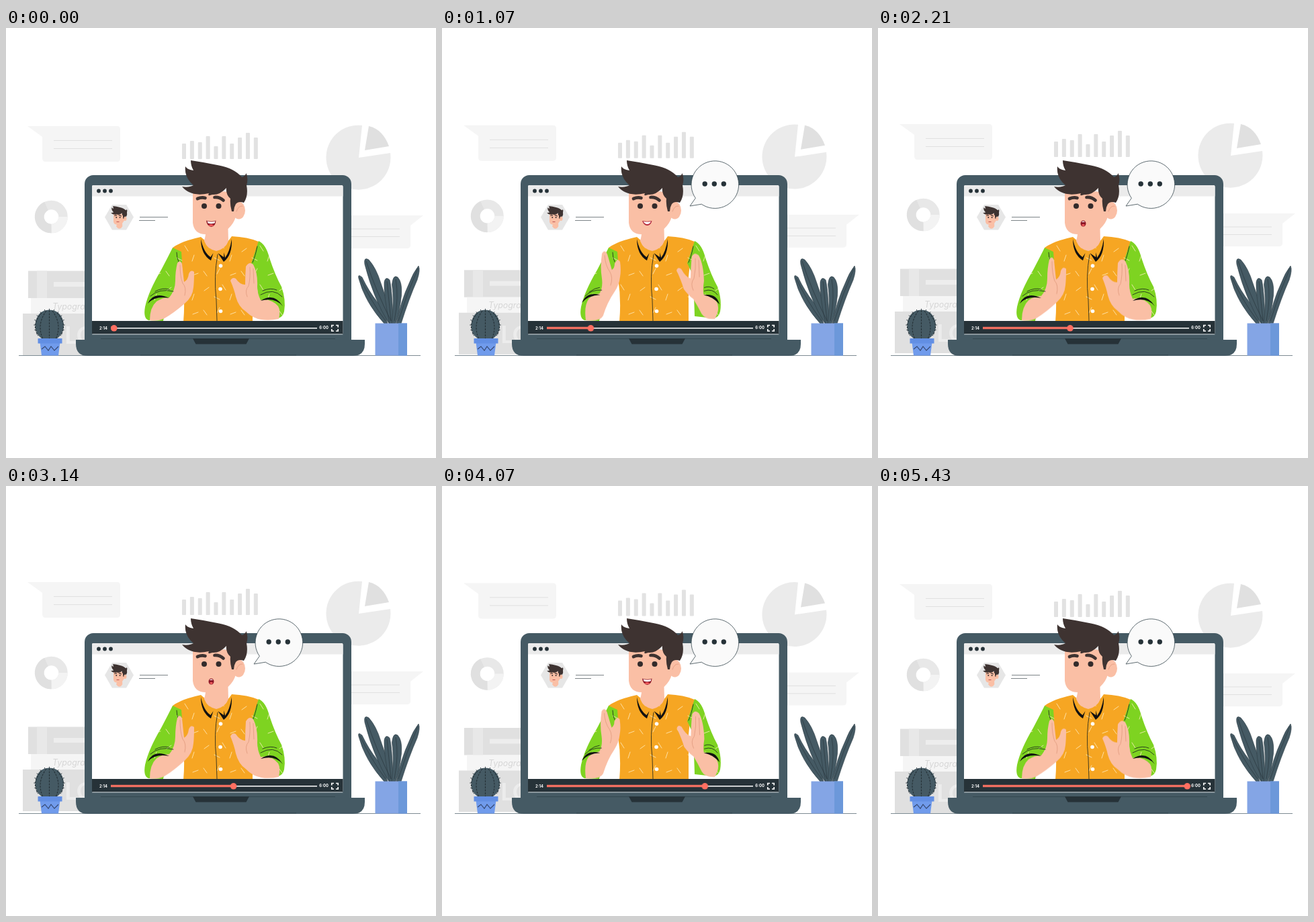
Animation of 640x640 px, one loop 5.5 s. Source, as an HTML page:

```html
<!DOCTYPE html>
<html lang="en">
<head>
<meta charset="utf-8">
<title>Video lesson</title>
<style>
html, body { margin: 0; width: 100%; height: 100%; overflow: hidden; background: #fff; }
svg { display: block; width: 100%; height: 100%; }
text { font-family: Inter, "Open Sans", sans-serif; }
.float { animation: float 5.5s infinite; }
.bubble { transform-origin: 369px 265px; animation: pop 5.5s infinite; }
.knob { animation: slide 5.5s linear infinite; }
.played { transform-origin: 156px 446px; animation: fill 5.5s linear infinite; }
.arm path { animation: 5.5s cubic-bezier(.37, 0, .63, 1) infinite; }
.lift { transform-origin: 0 435px; animation: lift 5.5s cubic-bezier(.37, 0, .63, 1) infinite; }
#lHand { animation-name: lHand; }
#lLine { animation-name: lLine; }
#lCuff { animation-name: lCuff; }
#lFold { animation-name: lFold; }
#rHand { animation-name: rHand; }
#rLine { animation-name: rLine; }
#rCuff { animation-name: rCuff; }
#rFold { animation-name: rFold; }
.skin { fill: #fabfa5; }
.crease { fill: none; stroke: #d98f72; stroke-width: .6; stroke-linecap: round; }
.thin { fill: none; stroke: #16201c; stroke-width: .8; stroke-linecap: round; }
.hair { fill: #3e3331; }
.leaf { fill: #455a64; stroke: #2c3c44; stroke-width: .6; }

@keyframes float {
  0%, 100% { transform: translateY(0); animation-timing-function: cubic-bezier(.37, 0, .63, 1); }
  48% { transform: translateY(-3.2px); animation-timing-function: cubic-bezier(.37, 0, .63, 1); }
}
@keyframes pop {
  0%, 5.4% { transform: scale(0); animation-timing-function: ease-in-out; }
  15.6%, 100% { transform: scale(1); }
}
@keyframes slide { 0% { transform: translateX(0); } 96.2%, 100% { transform: translateX(299.5px); } }
@keyframes fill { 0% { transform: scaleX(.015); } 96.2%, 100% { transform: scaleX(1); } }

/* each swing first stretches the low pose upwards, then turns it outwards */
@keyframes lift {
  0%, 21.8%, 49.5%, 76%, 81%, 100% { transform: scaleY(1); }
  7.3%, 40.2%, 58.9%, 92.7% { transform: scaleY(1.065); }
}
@keyframes lHand {
  0%, 7.3%, 40.2%, 58.9%, 92.7%, 100% { d: path("M214 435 Q214 416 224 407 Q233 401 243 401 Q252 391 252 376 Q252 362 255 350 Q259 344 262 351 L265 378 Q271 375 272 366 Q275 359 280 363 Q280 378 279 386 Q278 400 266 410 Q250 424 236 432 Q226 437 214 435Z"); }
  21.8%, 76%, 81% { d: path("M214 435 Q211 413 218 403 Q224 397 234 395 Q239 386 237 372 Q234 355 237 335 Q241 328 245 336 L252 359 Q256 357 256 350 Q260 341 264 347 Q266 360 264 370 Q263 381 256 392 Q246 407 240 428 Q236 437 214 435Z"); }
}
@keyframes lLine {
  0%, 7.3%, 40.2%, 58.9%, 92.7%, 100% { d: path("M259 353 Q259 370 263 380 Q269 386 266 398"); }
  21.8%, 76%, 81% { d: path("M241 338 Q242 353 249 362 Q254 371 250 382"); }
}
@keyframes lCuff {
  0%, 7.3%, 40.2%, 58.9%, 92.7%, 100% { d: path("M211 410 Q220 391 243 402 Q222 398 211 410Z"); }
  21.8%, 76%, 81% { d: path("M208 409 Q215 392 235 397 Q217 398 208 409Z"); }
}
@keyframes lFold {
  0%, 7.3%, 40.2%, 58.9%, 92.7%, 100% { d: path("M215 399 Q228 387 249 392 M222 392 Q233 386 243 389"); }
  21.8%, 76%, 81% { d: path("M213 399 Q222 389 237 390 M219 393 Q227 387 234 386"); }
}
@keyframes rHand {
  0%, 7.3%, 40.2%, 58.9%, 92.7%, 100% { d: path("M406 433 Q409 420 405 414 Q395 402 379 405 Q374 395 374 385 Q375 365 368 352 Q362 347 357 355 Q356 368 356 382 Q348 382 342 373 Q337 370 334 376 Q340 390 342 400 Q346 415 357 422 Q367 432 380 434 Q392 436 406 433Z"); }
  21.8%, 76%, 81% { d: path("M406 433 Q415 418 409 407 Q402 399 390 396 Q389 388 391 376 Q390 350 383 338 Q377 332 373 339 Q371 354 371 372 Q364 371 357 358 Q352 354 350 360 Q357 375 361 388 Q368 397 375 402 Q381 412 387 425 Q392 434 406 433Z"); }
}
@keyframes rLine {
  0%, 7.3%, 40.2%, 58.9%, 92.7%, 100% { d: path("M363 356 Q364 372 361 384 Q355 390 359 400 M368 358 L369 380"); }
  21.8%, 76%, 81% { d: path("M378 343 Q379 358 376 372 Q370 380 375 390 M383 345 L384 370"); }
}
@keyframes rCuff {
  0%, 7.3%, 40.2%, 58.9%, 92.7%, 100% { d: path("M379 406 Q399 393 412 414 Q400 400 379 406Z"); }
  21.8%, 76%, 81% { d: path("M390 397 Q409 394 413 411 Q404 400 390 397Z"); }
}
@keyframes rFold {
  0%, 7.3%, 40.2%, 58.9%, 92.7%, 100% { d: path("M379 397 Q398 386 411 400 M382 391 Q394 386 403 390"); }
  21.8%, 76%, 81% { d: path("M391 391 Q403 387 410 397 M391 386 Q398 383 405 388"); }
}
</style>
</head>
<body>
<svg viewBox="0 0 640 640">
  <defs>
    <pattern id="dashes" width="56" height="58" patternUnits="userSpaceOnUse" patternTransform="translate(8 4)">
      <path d="M6 10l5 7M30 6l-4 8M46 16l8-3M14 34l-7 5M34 30l5 8M48 44l-3 9M22 48l8 4"
        stroke="#ffeec2" stroke-width=".8" stroke-linecap="round"/>
    </pattern>
    <clipPath id="aboveBar"><rect width="640" height="436"/></clipPath>
    <path id="torso" d="M248 327 Q262 317 290 311 L297 317 L331 317 L336 310 Q360 311 376 318 Q369 345 367 370 V437 H264 Q267 405 262 372 Z"/>
    <path id="lSleeve" d="M248 327 Q240 343 231 360 Q212 392 207 415 Q204 432 212 435 L234 436 Q238 410 250 390 Q260 370 262 348 L261 333 Z"/>
    <path id="rSleeve" d="M376 317 Q387 322 392 342 Q401 369 410 385 Q417 405 414 422 Q412 431 404 432 L376 429 Q375 385 371 363 L365 350 Z"/>
    <g id="head">
      <ellipse class="skin" cx="346.500" cy="271.500" rx="9.500" ry="13"/>
      <path class="skin" d="M278 240V290Q280 307 297 307Q296 315 294 318Q300 329 313 332Q326 329 331 318L330.500 299Q340 290 342 280L345 245Z"/>
      <path class="crease" d="M343 273Q346 264 352 265"/>
      <path class="hair" d="M275 197Q296 200 317 204.500Q340 209 351 222Q356 221 357.500 216Q361 224 358 234Q361 250 354 260Q346 257 342 262Q339 267 339 273L336 273Q333 262 334 254Q327 248 328 238Q318 249 307 248Q299 251 302 246Q275 252 262 236Q271 238 279 234Q265 222 267 206Q270 211 279 212Q275 205 275 197Z"/>
      <path d="M285 254Q291 251.500 296.500 253M310.500 252Q318 251.500 323.500 256.500" fill="none" stroke="#3e3331" stroke-width="4.700" stroke-linecap="round"/>
      <circle cx="295" cy="265" r="4" fill="#332b2b"/><circle cx="316.500" cy="265" r="4" fill="#332b2b"/>
    </g>
  </defs>

  <!-- drifting backdrop -->
  <g class="float">
    <path d="M32 146H165q5 0 5 5v43q0 5-5 5H59q-5 0-5-5V162Z" fill="#f5f5f5"/>
    <path d="M71 167.500H158M71 179.500H158" stroke="#e0e0e0"/>
    <path d="M621 279H500v49h97q5 0 5-5v-29Z" fill="#f5f5f5"/>
    <path d="M510 299H586M510 310.500H586" stroke="#e0e0e0"/>
    <g id="bars" fill="#e2e2e2"></g>
    <path d="M525 193L530 145A48 48 0 1 0 572 186Z" fill="#ebebeb"/>
    <path d="M534 182L540 146Q561 151 570 176Z" fill="#e0e0e0"/>
    <g fill="none" stroke-width="13.500">
      <circle cx="67.500" cy="281" r="17.500" stroke="#e8e8e8"/>
      <path d="M85 281A17.500 17.500 0 0 1 67.500 298.500" stroke="#f3f3f3"/>
      <path d="M67.500 298.500A17.500 17.500 0 0 1 60 265" stroke="#e0e0e0"/>
    </g>
    <path d="M33 361.500H120V402H33Z" fill="#e0e0e0"/>
    <path d="M46 361.500H61V402H46Z" fill="#e8e8e8"/>
    <path d="M71 378H120V385H71Z" fill="#ededed"/>
    <path d="M37 402H120V425H37Z" fill="#f5f5f5"/>
    <path d="M25 425H120V487H25Z" fill="#e0e0e0"/>
    <text x="69" y="418.500" font-size="12.400" font-style="italic" fill="#d6d6d6">Typography</text>
    <text x="87" y="470" font-size="36" font-weight="700" fill="#ececec" style="font-family: Lato, sans-serif">LO</text>
  </g>

  <path d="M19 487.500H617" stroke="#455a64" stroke-width=".7"/>

  <!-- laptop -->
  <rect x="117" y="219" width="397" height="260" rx="13" fill="#455a64"/>
  <rect x="128" y="234" width="373.500" height="222" rx="2" fill="#fff"/>
  <path d="M128 250.500V236q0-2 2-2H499.500q2 0 2 2V250.500Z" fill="#ebebeb"/>
  <g fill="#263238">
    <circle cx="138" cy="242.500" r="2.900"/><circle cx="147" cy="242.500" r="2.900"/><circle cx="156" cy="242.500" r="2.900"/>
  </g>
  <path d="M104 464H534V470Q534 488 516 488H122Q104 488 104 470Z" fill="#455a64"/>
  <path d="M141 462.500H490M200 487H432" stroke="#34464f" stroke-width=".9"/>
  <path d="M278 462H362L357.500 470.500H282.500Z" fill="#263238"/>

  <!-- profile -->
  <path d="M147 281.500L158 263H179L190 281.500L179 300.500H158Z" fill="#e6e6e6"/>
  <use href="#head" transform="translate(90.500 215.800) scale(.25)"/>
  <path d="M164.500 288.500h4" stroke="#b94b4b" stroke-width=".9"/>
  <path d="M199 281.500H241M198 286.500H222" stroke="#263238" stroke-width=".6"/>

  <!-- presenter -->
  <g clip-path="url(#aboveBar)">
    <use href="#torso" fill="#f6a623"/><use href="#torso" fill="url(#dashes)"/>
    <use href="#head"/>

    <g class="mouth" data-shape="w">
      <path d="M298 286.500Q306 289 312.500 286.500Q312 295 305.500 296Q299 295 298 286.500Z" fill="#8c1626"/>
      <path d="M299.500 287.500Q306 289.500 311.500 287.500L310.500 290.500Q305 292 300.500 290.500Z" fill="#fff"/>
      <path d="M301 293.500Q305 290.500 309.500 293.500Q305.500 297 301 293.500Z" fill="#ef5b5b"/>
    </g>
    <g class="mouth" data-shape="t">
      <path d="M298 287Q305 288.500 312.500 287Q311 293.500 305.500 294Q300 293.500 298 287Z" fill="#b3273a"/>
      <path d="M299.500 288Q305 289 311 288Q309 292 305.500 292Q302 292 299.500 288Z" fill="#fff"/>
    </g>
    <g class="mouth" data-shape="o">
      <ellipse cx="305.500" cy="291" rx="4" ry="4.500" fill="#8c1626"/>
      <path d="M302.700 289Q305.500 285.800 308.300 289Z" fill="#fff"/>
      <ellipse cx="305.500" cy="293.300" rx="2.300" ry="1.500" fill="#ef5b5b"/>
    </g>

    <path d="M290 313Q291 335 305 346L309 333Q300 329 295 317Z" fill="#f6a623"/>
    <path d="M336 311Q336 338 324 348L316 334Q327 329 331 317Z" fill="#f6a623"/>
    <path d="M290 314Q290 337 305 346L308.500 335L304.500 341Q294 334 290 314ZM336 314Q337 338 324 348L315.500 335L324 341L324.500 334L326 342Q333 333 336 314Z" fill="#111"/>
    <path class="thin" d="M315 337Q309 370 313 405L314 436M373 328Q370 342 366 350"/>
    <g fill="#fff">
      <circle cx="319.500" cy="354" r="2.800"/><circle cx="319" cy="388.500" r="2.800"/><circle cx="319.500" cy="421.500" r="2.800"/>
    </g>

    <g class="arm">
      <use href="#lSleeve" fill="#7ed321"/><use href="#lSleeve" fill="url(#dashes)"/>
      <path class="thin" d="M254 334Q254 342 257 348"/>
      <g class="lift"><path class="skin" id="lHand"/><path class="crease" id="lLine"/></g>
      <path id="lCuff" fill="#111"/>
      <path class="thin" id="lFold"/>
    </g>
    <g class="arm">
      <use href="#rSleeve" fill="#7ed321"/><use href="#rSleeve" fill="url(#dashes)"/>
      <path class="thin" d="M374 325Q371 340 367 349"/>
      <g class="lift"><path class="skin" id="rHand"/><path class="crease" id="rLine"/></g>
      <path id="rCuff" fill="#111"/>
      <path class="thin" id="rFold"/>
    </g>
  </g>

  <!-- player bar -->
  <path d="M128 436H501.500V455.500H128Z" fill="#263238"/>
  <path d="M128 456H501.500" stroke="#b8c3c8" stroke-width=".8"/>
  <g font-size="5.800" font-weight="700" fill="#fff">
    <text x="139" y="448.700">2:14</text>
    <text x="466.300" y="448.300">6:00</text>
  </g>
  <path d="M160 446.700H463" stroke="#fff" stroke-width="1.500"/>
  <rect class="played" x="156" y="444.800" width="304" height="3.400" fill="#f26f61"/>
  <circle class="knob" cx="160.800" cy="446.800" r="4.800" fill="#ff6f61"/>
  <path d="M484.800 445.500V442.500H488M491 442.500H494.200V445.500M494.200 448V451H491M488 451H484.800V448" fill="none" stroke="#fff" stroke-width="1.700"/>

  <!-- speech bubble -->
  <g class="bubble">
    <path d="M377.300 253.200A35.300 35.300 0 1 1 386.300 262.200L369 265Z" fill="#fafafa" stroke="#37474f" stroke-width=".8"/>
    <g fill="#263238">
      <circle cx="391.200" cy="232" r="3.700"/><circle cx="405.300" cy="232" r="3.700"/><circle cx="419.300" cy="232" r="3.700"/>
    </g>
  </g>

  <!-- cactus -->
  <g id="spikes" stroke="#263238" stroke-width=".9"></g>
  <path d="M54 463Q43 455 43.500 441Q46 420 64.500 419.500Q83 420 86 441Q86 455 75 463Z" fill="#455a64"/>
  <path d="M64.500 420V463M60 421Q45 441 55 463M69 421Q84 441 74 463M53 424Q37 442 48 458M76 424Q92 442 81 458"
    fill="none" stroke="#263238" stroke-width="1.100" stroke-dasharray="3 1.500"/>
  <path d="M50.500 468H80.500L78 487.500H53Z" fill="#709bec"/>
  <path d="M47.500 462H83.500V469.500H47.500Z" fill="#628fe4"/>
  <path d="M53 478l5-4 5 6 4-6 5 6 6-6" fill="none" stroke="#34466e" stroke-width="1.100"/>

  <!-- tall plant -->
  <path class="leaf" d="M563 440Q534 408 525 373Q523 365 530 371Q540 392 553 408Q564 422 568 440Z"/>
  <path class="leaf" d="M570 440Q547 403 534 352Q532 340 540 345Q551 357 558 380Q568 408 577 440Z"/>
  <path class="leaf" d="M571 440Q562 400 563 378Q565 369 571 375Q575 390 576 440Z"/>
  <path class="leaf" d="M574 440Q578 405 574.500 382Q576 366 583 371Q590 378 588.500 398Q586 422 580 440Z"/>
  <path class="leaf" d="M581 440Q588 405 600 380Q606 364 614 354Q617 360 612 375Q600 402 588 440Z"/>
  <path d="M527 372Q542 405 565 436M536 347Q550 390 573 436M567 377L573 436M580 374Q585 400 578 436M613 358Q596 396 584 436"
    fill="none" stroke="#263238" stroke-width=".6"/>
  <path d="M549.500 439.500H597V487.500H549.500Z" fill="#84a5e5"/>
  <path d="M584 439.500H597V487.500H584Z" fill="#6c98da"/>
</svg>
<script>
const ns = "http://www.w3.org/2000/svg";
const add = (id, tag, attrs) => {
  const el = document.createElementNS(ns, tag);
  for (const k in attrs) el.setAttribute(k, attrs[k]);
  document.getElementById(id).append(el);
};

[23, 27, 25, 34, 19, 34, 23, 32, 39, 32].forEach((h, i) =>
  add("bars", "rect", { x: 262 + i * 11.87, y: 195 - h, width: 6, height: h, rx: 1 }));

for (let i = 0; i < 15; i++) {
  const a = Math.PI * (.8 + i * 1.4 / 14);
  const at = k => [64.5 + Math.cos(a) * (20 + k), 442 + Math.sin(a) * (21 + k)];
  const [x1, y1] = at(0), [x2, y2] = at(3.2);
  add("spikes", "line", { x1, y1, x2, y2 });
}

// one letter per 200 ms: wide, teeth, round, none
const speech = "wwtottwowtootwtootwtwwttowtn";
const mouths = document.querySelectorAll(".mouth");
function talk() {
  const t = performance.now() % 5500;
  const shape = speech[Math.floor((t + 40) / 200)];
  mouths.forEach(m => m.style.display = m.dataset.shape === shape ? "" : "none");
  requestAnimationFrame(talk);
}
talk();
</script>
</body>
</html>
```
